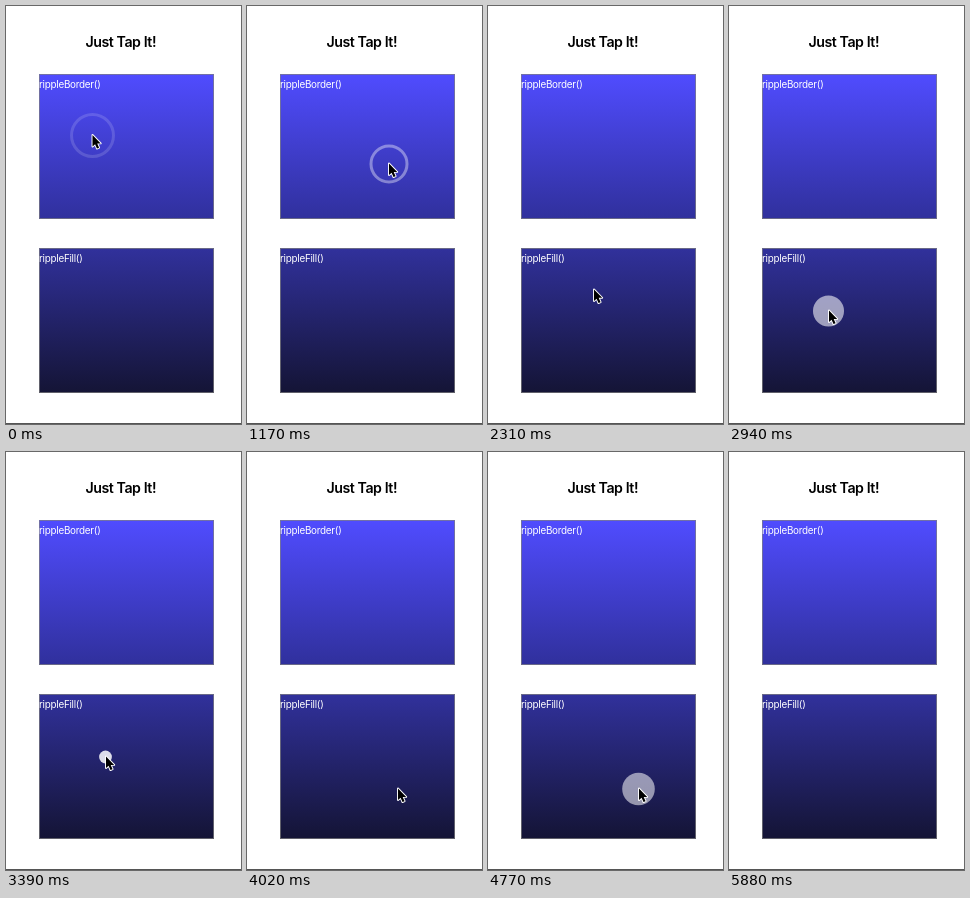
An HTML page with a canvas for the animation above (5910 ms loop, 235 px wide and 418 px high).

```html
<!DOCTYPE html>
<html lang="en">
<head>
<meta charset="utf-8">
<title>Just Tap It!</title>
<style>
  html, body { margin: 0; width: 100%; height: 100%; overflow: hidden; background: #fff; }
  #stage { position: absolute; left: 0; top: 0; width: 235px; height: 418px; overflow: hidden;
    font-family: Inter, Roboto, sans-serif; }
  h1 { position: absolute; left: 79.5px; top: 26px; margin: 0; white-space: nowrap;
    font-size: 14.2px; line-height: 20px; font-weight: 600; letter-spacing: -.45px; color: #000; }
  .panel { position: absolute; left: 33px; width: 175px; height: 145px; box-sizing: border-box;
    border: 1px solid rgba(128, 128, 128, .7); background-origin: border-box; }
  .panel span { position: absolute; left: -1px; top: 2px; white-space: nowrap;
    font-size: 9.9px; line-height: 14px; letter-spacing: -.26px; color: #fff; }
  #outline { top: 68px; background-image: linear-gradient(#504cff, #30309c); }
  #solid { top: 242px; background-image: linear-gradient(#31319c, #141435); }
  #edge { position: absolute; left: 0; top: 417px; width: 235px; height: 1px; background: #555; }
  canvas { position: absolute; left: 0; top: 0; width: 235px; height: 418px; }
</style>
</head>
<body>
<div id="stage">
  <h1>Just Tap It!</h1>
  <div class="panel" id="outline"><span>rippleBorder()</span></div>
  <div class="panel" id="solid"><span>rippleFill()</span></div>
  <div id="edge"></div>
  <canvas></canvas>
</div>
<script>
const W = 235, H = 418, LOOP = 5910, STEP = 30;
const RIPPLE_MS = 400, RADIUS = 23, RING = 3;

const canvas = document.querySelector('canvas');
const ctx = canvas.getContext('2d');
const scale = window.devicePixelRatio || 1;
canvas.width = Math.round(W * scale);
canvas.height = Math.round(H * scale);

// Pointer stops: arrival time, departure time, position
const stops = [
  { from: 0, to: 480, x: 86.5, y: 129 },
  { from: 840, to: 1830, x: 142, y: 157.5 },
  { from: 2460, to: 3540, x: 100, y: 304.5 },
  { from: 3900, to: 5220, x: 151, y: 336.5 },
  { from: 5760, to: LOOP, x: 168, y: 424 }
];

const taps = [
  { at: -340, stop: 0 }, { at: 222, stop: 0 },
  { at: 926, stop: 1 }, { at: 1488, stop: 1 },
  { at: 2768, stop: 2, fill: true }, { at: 3330, stop: 2, fill: true },
  { at: 4024, stop: 3, fill: true }, { at: 4586, stop: 3, fill: true }
];

const arrow = new Path2D('M0 0V11.6L2.6 9.2L4.5 13.6L6.6 12.7L4.7 8.4H8.2Z');

const easeInOut = k => k * k * (3 - 2 * k);
const easeOut = k => 1 - (1 - k) ** 2;

function pointerAt(t) {
  const next = stops.findIndex(s => t < s.from);
  const a = stops[next < 0 ? stops.length - 1 : next - 1];
  if (next < 0 || t <= a.to) return a;
  const b = stops[next];
  const k = easeInOut((t - a.to) / (b.from - a.to));
  return { x: a.x + (b.x - a.x) * k, y: a.y + (b.y - a.y) * k };
}

function drawRipple(tap, t) {
  const k = (t - tap.at) / RIPPLE_MS;
  if (k <= 0 || k >= 1) return;
  const { x, y } = stops[tap.stop];
  const r = RADIUS * easeOut(k);
  ctx.globalAlpha = 1 - k;
  ctx.beginPath();
  if (tap.fill) {
    ctx.arc(x - .5, y + .5, r, 0, Math.PI * 2);
    ctx.fillStyle = '#fff';
    ctx.fill();
  } else {
    const line = Math.min(RING, r);
    ctx.arc(x, y + .5, r - line / 2, 0, Math.PI * 2);
    ctx.strokeStyle = '#fff';
    ctx.lineWidth = line;
    ctx.stroke();
  }
  ctx.globalAlpha = 1;
}

function drawPointer({ x, y }) {
  ctx.save();
  ctx.translate(x, y);
  ctx.lineWidth = 1.9;
  ctx.lineJoin = 'round';
  ctx.strokeStyle = '#fff';
  ctx.stroke(arrow);
  ctx.fillStyle = '#000';
  ctx.fill(arrow);
  ctx.restore();
}

function draw(t) {
  ctx.setTransform(scale, 0, 0, scale, 0, 0);
  ctx.clearRect(0, 0, W, H);
  taps.forEach(tap => drawRipple(tap, t));
  drawPointer(pointerAt(t));
}

const start = performance.now();
function tick() {
  const t = (performance.now() - start) % LOOP;
  draw(Math.floor(t / STEP) * STEP);
  requestAnimationFrame(tick);
}
tick();
</script>
</body>
</html>
```
